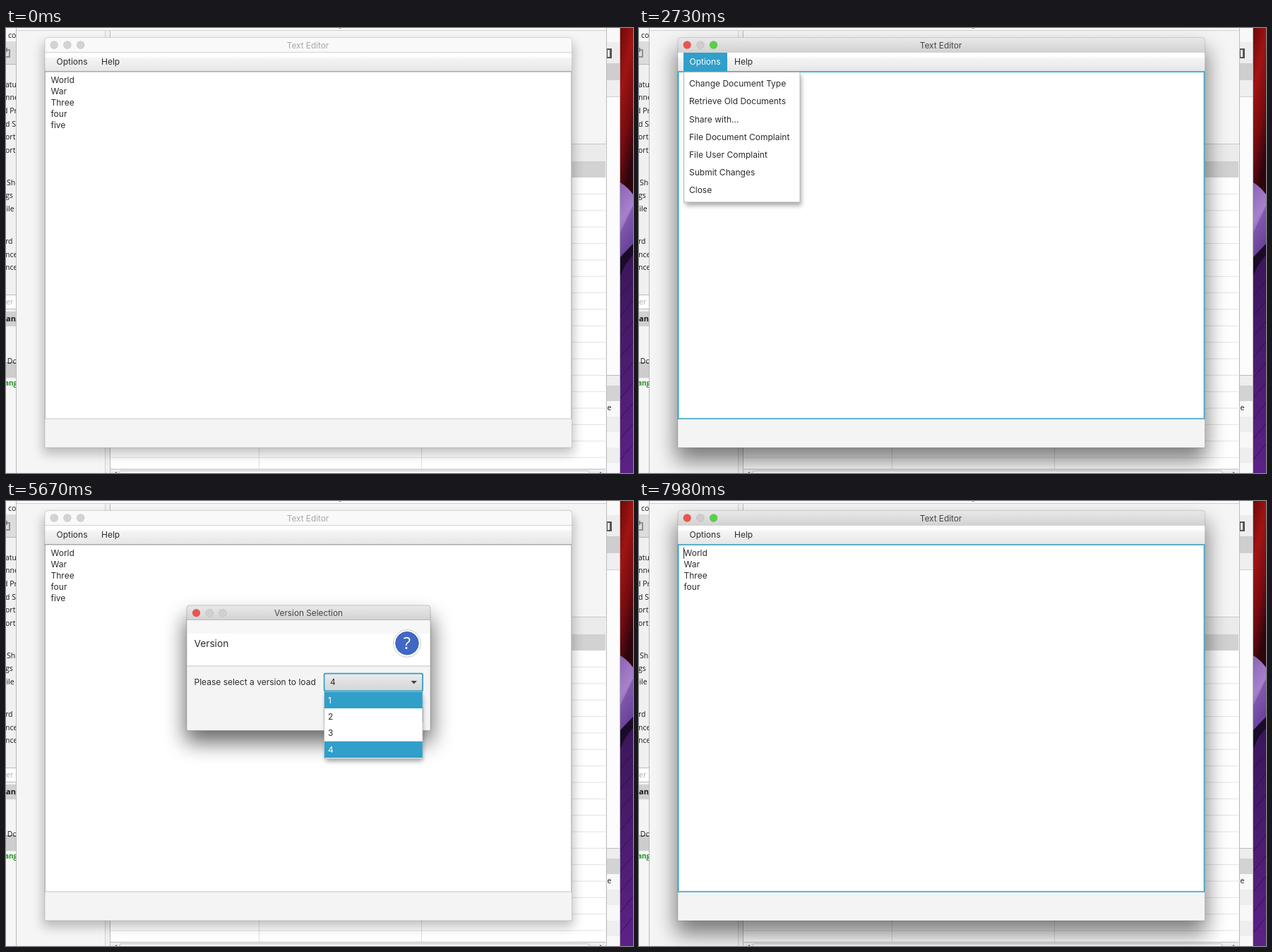
An HTML page that plays this animation: 888 px wide and 631 px high, repeating every 8000 ms.

```html
<!DOCTYPE html>
<html lang="en">
<head>
<meta charset="utf-8">
<title>Text Editor</title>
<style>
html, body { margin: 0; width: 100%; height: 100%; overflow: hidden; background: #f4f4f4; }
svg { display: block; width: 100%; height: 100%; }
text { font: 12px Inter, sans-serif; fill: #2b2b2b; white-space: pre; }
.title { font-size: 11.8px; text-anchor: middle; }
.side { font: 500 10.5px "Open Sans", "Noto Sans", sans-serif; fill: #151515; }
.bold { font-weight: 700; font-size: 11px; }
.mid { text-anchor: middle; }
</style>
</head>
<body>
<svg id="stage" viewBox="0 0 888 631">
<defs>
  <linearGradient id="bar" x2="0" y2="1"><stop stop-color="#e9e9e9"/><stop offset="1" stop-color="#d2d2d2"/></linearGradient>
  <linearGradient id="menubar" x2="0" y2="1"><stop offset=".2" stop-color="#fff"/><stop offset=".3" stop-color="#f5f5f5"/><stop offset="1" stop-color="#e6e6e6"/></linearGradient>
  <linearGradient id="button" x2="0" y2="1"><stop stop-color="#f6f6f6"/><stop offset="1" stop-color="#dadada"/></linearGradient>
  <linearGradient id="combo" x2="0" y2="1"><stop stop-color="#ececec"/><stop offset="1" stop-color="#d4d4d4"/></linearGradient>
  <linearGradient id="okFill" x2="0" y2="1"><stop stop-color="#b9dfee"/><stop offset="1" stop-color="#93c9df"/></linearGradient>
  <linearGradient id="red" x2=".35" y2="1"><stop stop-color="#6d0909"/><stop offset=".35" stop-color="#a01413"/><stop offset=".7" stop-color="#740b10"/><stop offset="1" stop-color="#2c050d"/></linearGradient>
  <linearGradient id="violet" x2=".25" y2="1"><stop stop-color="#8a62b4"/><stop offset=".5" stop-color="#a781cc"/><stop offset="1" stop-color="#5f3b93"/></linearGradient>
  <linearGradient id="plum" x2="0" y2="1"><stop stop-color="#190a24"/><stop offset=".16" stop-color="#41205f"/><stop offset=".5" stop-color="#3a1659"/><stop offset="1" stop-color="#5c2187"/></linearGradient>
  <filter id="soft" x="-20%" y="-20%" width="140%" height="140%"><feGaussianBlur stdDeviation="8"/></filter>
  <filter id="deep" x="-30%" y="-50%" width="160%" height="200%"><feGaussianBlur stdDeviation="15"/></filter>
  <filter id="near" x="-20%" y="-20%" width="140%" height="140%"><feGaussianBlur stdDeviation="3"/></filter>
  <clipPath id="leftClip"><path d="M0 0H14V631H0z"/></clipPath>
</defs>
</svg>
<script>
const stage = document.getElementById('stage');
const BLUE = '#309fca', LOOP = 8000;

const rect = (x, y, w, h, fill, more = '') =>
  `<rect x="${x}" y="${y}" width="${w}" height="${h}" fill="${fill}" ${more}/>`;
const line = (x1, y1, x2, y2, color, w = 1) =>
  `<path d="M${x1} ${y1}L${x2} ${y2}" stroke="${color}" stroke-width="${w}"/>`;
const text = (x, y, s, more = '') => `<text x="${x}" y="${y}" ${more}>${s}</text>`;
const group = (id, body) => `<g id="${id}">${body}</g>`;
const each = (n, fn) => Array.from({ length: n }, (_, i) => fn(i)).join('');
const topBar = (x, y, w, h, fill) =>
  `<path d="M${x} ${y + h}V${y + 4}q0-4 4-4H${x + w - 4}q4 0 4 4V${y + h}z" fill="${fill}"/>`;
const lights = (x, y, colors) => colors.map((c, i) =>
  `<circle cx="${x + i * 18.7}" cy="${y}" r="5.5" fill="${c}" stroke="#000" stroke-opacity=".1" stroke-width=".7"/>`).join('');

function wallpaper() {
  return rect(870, 0, 18, 631, 'url(#plum)') +
    `<path d="M870 0H888V236L870 219z" fill="url(#red)"/>
     <path d="M870 219Q881 226 888 236V306L870 325z" fill="url(#violet)"/>
     <path d="M870 290L888 252V306L870 325z" fill="#6e47a0" opacity=".6"/>
     <path d="M870 325L888 306V322Q876 334 870 352z" fill="#1a0b28"/>` +
    each(9, i => line(870, 380 + i * 29, 888, 358 + i * 29, '#260d3d', .7));
}

function leftPane() {
  const labels = [[3, 14, 'co'], [-1, 84, 'atus'], [-1, 102, 'nne'], [-4, 121, 'd Pr'], [-1, 140, 'd S'],
    [-1, 158, 'ort'], [-1, 177, 'ort'], [1, 223, 'Sho'], [-1, 241, 'gs'], [-5, 260, 'File'],
    [-1, 306, 'rd'], [-1, 325, 'nce'], [-1, 343, 'nce'], [-1, 476, ' Do']];
  return `<g clip-path="url(#leftClip)">` +
    rect(0, 0, 14, 631, '#f0f0f0') + rect(0, 0, 14, 19, '#f7f7f7') + rect(0, 19, 14, 32, '#dcdcdc') +
    line(0, 51.5, 14, 51.5, '#b4b4b4') +
    `<path d="M-3 31H5V41H-3M1 28V34" fill="none" stroke="#777" stroke-width="1.5"/>` +
    rect(-4, 378.5, 20, 20, '#fff', 'stroke="#bbb"') + rect(0, 402, 14, 21, '#d0d0d0') +
    rect(0, 424, 14, 50, '#f4f4f4') + rect(0, 474, 14, 22, '#cdcdcd') + line(0, 474.5, 14, 474.5, '#999') +
    rect(0, 497, 14, 134, '#f6f6f6') +
    labels.map(([x, y, s]) => text(x, y, s, 'class="side"')).join('') +
    text(0, 392, 'er', 'class="side" style="fill:#aaa"') +
    text(0, 416, 'ang', 'class="side bold"') +
    text(-2, 507, 'ang', 'class="side bold" style="fill:#278a27;font-size:10px"') + '</g>';
}

function rightPane() {
  return rect(850, 0, 20, 631, '#f8f8f8') + rect(850, 20, 20, 30, '#ededed') +
    rect(851, 29, 7, 14, '#555') + rect(852, 31, 3, 10, '#eee') +
    rect(850, 50, 20, 24, '#cecece') + rect(850, 74, 20, 24, '#efefef') +
    line(850, 97.5, 870, 97.5, '#d0d0d0') + rect(851, 98, 18, 394, '#fcfcfc') +
    line(850, 492.5, 870, 492.5, '#bbb') + rect(850, 493, 20, 14, '#eee') +
    rect(850, 507, 20, 22, '#d3d3d3') + each(4, i => rect(850, 551 + i * 44, 20, 22, '#eeeeee')) +
    text(845, 542, 'ne', 'class="side"') + line(869.5, 0, 869.5, 631, '#b5b5b5');
}

function backWindow() {
  return rect(14, 0, 836, 631, '#f5f5f5') + rect(14, 0, 836, 3, '#fafafa') + line(14, 3.5, 850, 3.5, '#d0d0d0') +
    `<circle cx="473" cy="-1" r="2" fill="#888"/>` +
    rect(140, 4, 8, 627, '#f0f0f0') + line(140.5, 4, 140.5, 631, '#cfcfcf') + line(147.5, 4, 147.5, 631, '#bdbdbd') +
    rect(148, 165, 701, 460, '#fff') + rect(148, 165, 701, 24, '#ebebeb') + line(148, 164.5, 850, 164.5, '#c8c8c8') +
    rect(148, 189, 701, 23, '#d2d2d2') +
    each(18, i => line(148, 235.5 + i * 23.35, 849, 235.5 + i * 23.35, '#e2e2e2')) +
    line(358.5, 212, 358.5, 625, '#dedede') + line(588.5, 212, 588.5, 625, '#dedede') +
    rect(148, 625, 701, 6, '#ededed') + line(148, 625.5, 849, 625.5, '#c0c0c0') +
    rect(161, 628, 665, 6, '#fafafa', 'rx="2" stroke="#bbb"') +
    `<path d="M157 629l-3 2 3 2M841 629l3 2-3 2" fill="#666"/>` +
    line(14.5, 0, 14.5, 631, '#b8b8b8') + line(850.5, 0, 850.5, 631, '#bcbcbc');
}

function editor() {
  const words = ['World', 'War', 'Three', 'four', 'five'];
  return group('softShade', rect(52, 22, 752, 582, '#000', 'filter="url(#soft)" opacity=".24"')) +
    group('deepShade', rect(52, 30, 752, 584, '#000', 'filter="url(#deep)" opacity=".5"')) +
    topBar(55, 13.5, 746.5, 581.5, '#f4f4f4') +
    group('idleBar', topBar(55, 13.5, 746.5, 21, '#f9f9f9') + lights(68.2, 24, ['#d3d3d3', '#d3d3d3', '#d3d3d3']) +
      text(427.5, 28.6, 'Text Editor', 'class="title" style="fill:#a8a8a8"')) +
    group('liveBar', topBar(55, 13.5, 746.5, 21, 'url(#bar)') + lights(68.2, 24, ['#eb5450', '#cecece', '#57cf48']) +
      text(427.5, 28.6, 'Text Editor', 'class="title" style="fill:#444"')) +
    line(55, 34.5, 801.5, 34.5, '#d4d4d4') + rect(55, 35, 746.5, 26, 'url(#menubar)') +
    rect(55.5, 61.5, 745, 492.5, '#fff', 'stroke="#c4c4c4"') + line(55, 61.8, 801, 61.8, '#a9a9a9', 1.4) +
    group('focus', rect(56.5, 63, 743, 490, 'none', 'stroke="#d5edf5"') +
      rect(55.6, 62, 745, 492, 'none', `stroke="#3fa9cc" stroke-width="1.5"`)) +
    group('caret', line(63.5, 66, 63.5, 82, '#333')) +
    words.map((w, i) => text(63.5, 78.3 + i * 15.9, w, `id="word${i}"`)).join('') +
    rect(63, 35, 62, 26.5, BLUE, 'id="optionsBg"') +
    text(71.5, 52.3, 'Options', 'id="options"') + text(135, 52.3, 'Help') +
    `<path d="M55 595V17.500q0-4 4-4H797.500q4 0 4 4V595z" fill="none" stroke="#000" stroke-opacity=".18" stroke-width=".8"/>`;
}

function menu() {
  const items = ['Change Document Type', 'Retrieve Old Documents', 'Share with...', 'File Document Complaint',
    'File User Complaint', 'Submit Changes', 'Close'];
  return rect(66, 68, 164, 184, '#000', 'filter="url(#near)" opacity=".32"') +
    rect(63.5, 62.5, 164.5, 184.5, '#fff', 'stroke="#b4b4b4"') +
    items.map((s, i) => rect(64, 66.5 + i * 25.17, 163.5, 25.17, BLUE, `id="itemBg${i}"`) +
      text(71, 83.2 + i * 25.17, s, `id="item${i}"`)).join('');
}

function dialog() {
  const ring = rect(450.6, 244.6, 139.6, 24.8, 'none', `rx="2" stroke="#2e9fc9" stroke-width="1.7"`);
  const okRing = rect(525, 290.6, 65.4, 24.8, 'none', `rx="2" stroke="#2e9fc9" stroke-width="1.7"`);
  return rect(254, 166, 349, 176, '#000', 'filter="url(#deep)" opacity=".6"') +
    topBar(256, 148, 345, 177.5, '#f4f4f4') + topBar(256, 148, 345, 21, 'url(#bar)') +
    line(256, 168.500, 601, 168.500, '#b9b9b9') + lights(269.5, 158.7, ['#eb5450', '#d0d0d0', '#d0d0d0']) +
    text(428.5, 163, 'Version Selection', 'class="title" style="fill:#444"') +
    rect(256.500, 169, 344, 19, '#f7f7f7') + rect(256.500, 188, 344, 46, '#fff') +
    line(256.500, 234, 600.500, 234, '#c4c4c4') +
    text(266.5, 207, 'Version', 'style="font-size:13.7px"') +
    `<circle cx="568" cy="202" r="19.300" fill="#fff" stroke="#c9c9c9"/><circle cx="568" cy="201.700" r="16.300" fill="#4068c4" stroke="#3158ad" stroke-width=".8"/>` +
    text(568, 210.3, '?', 'class="mid" style="font:24px Open Sans,sans-serif;fill:#fff"') +
    text(266.5, 261.3, 'Please select a version to load') +
    rect(450.500, 244.500, 139.500, 25, 'url(#combo)', 'rx="2.500" stroke="#b0b0b0"') + group('comboRing', ring) +
    text(459, 261.3, '4', 'id="choice"') + `<path d="M573.500 255H582L577.700 259.500z" fill="#444"/>` +
    rect(450.500, 290.500, 65, 24.500, 'url(#button)', 'rx="2.500" stroke="#b8b8b8"') + text(483, 307.2, 'Cancel', 'class="mid"') +
    rect(525.300, 290.500, 65, 24.500, 'url(#okFill)', 'rx="2.500" stroke="#9db9c5"') + group('okRing', okRing) +
    text(558, 307.2, 'OK', 'class="mid"') +
    `<path d="M256 325.500V152q0-4 4-4H597q4 0 4 4V325.500z" fill="none" stroke="#000" stroke-opacity=".22" stroke-width=".8"/>`;
}

function versions() {
  return rect(453, 276, 137, 93, '#000', 'filter="url(#near)" opacity=".35"') +
    rect(450.700, 270.300, 139.300, 95, '#fff', 'stroke="#b9b9b9" stroke-width=".8"') +
    each(4, i => rect(451, 270.6 + i * 23.4, 138.800, 23.4, BLUE, `id="rowBg${i}"`) +
      text(456, 286.6 + i * 23.4, i + 1, `id="row${i}"`));
}

stage.insertAdjacentHTML('beforeend', wallpaper() + leftPane() + rightPane() + backWindow() + editor() +
  group('menu', menu()) + group('dialog', dialog()) + group('versions', versions()));

const el = {};
stage.querySelectorAll('[id]').forEach(n => el[n.id] = n);
const show = (id, on) => el[id].style.display = on ? '' : 'none';
const mark = (name, tail, on) => {
  show(name + 'Bg' + tail, on);
  el[name + tail].style.fill = on ? '#fff' : '';
};

// Value of the last step whose start has passed.
const at = (t, steps) => steps.reduce((v, [start, next]) => t >= start ? next : v, null);

function draw(t) {
  const scene = at(t, [[0, 'idle'], [2100, 'hover'], [2590, 'menu'], [3430, 'dialog'], [5040, 'list'], [6370, 'picked'], [7490, 'done']]);
  const live = scene === 'menu' || scene === 'done';
  const listed = scene === 'list', picked = scene === 'picked';

  for (const id of ['deepShade', 'liveBar', 'focus', 'caret']) show(id, live);
  for (const id of ['softShade', 'idleBar']) show(id, !live);
  show('word4', scene !== 'done');
  mark('options', '', scene === 'hover' || scene === 'menu');

  show('menu', scene === 'menu');
  const item = at(t, [[0, -1], [2940, 0], [3080, 1]]);
  for (let i = 0; i < 7; i++) mark('item', i, i === item);

  show('dialog', ['dialog', 'list', 'picked'].includes(scene));
  show('comboRing', listed || picked);
  show('okRing', scene === 'dialog');
  el.choice.textContent = picked ? 3 : 4;

  show('versions', listed);
  const row = at(t, [[0, -1], [5320, 0], [5950, 1], [6090, 2]]);
  for (let i = 0; i < 4; i++) mark('row', i, i === row || i === 3);
}

function tick() {
  draw(performance.now() % LOOP);
  requestAnimationFrame(tick);
}
tick();
</script>
</body>
</html>
```
